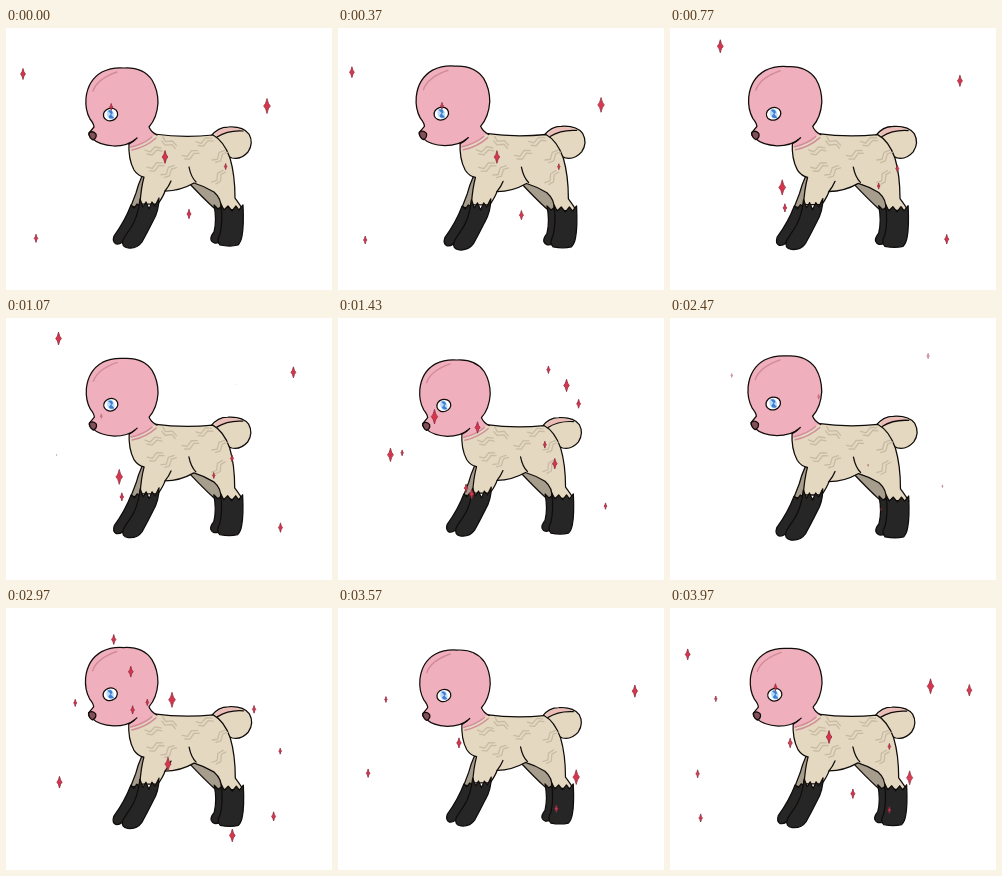
Animation of 326x262 px, one loop 4.01 s. Source, as an HTML page:

```html
<!DOCTYPE html>
<html lang="en">
<head>
<meta charset="utf-8">
<title>Sparkling lamb</title>
<style>
  html, body { margin: 0; width: 100%; height: 100%; overflow: hidden; background: #fff; }
  svg { display: block; width: 326px; height: 262px; }
  .line { fill: none; }
  .ink { stroke: #100c0a; stroke-width: 1.25; stroke-linejoin: round; stroke-linecap: round; }
  .wool { fill: #e4d8c0; }
  .shade { fill: #a79d8d; }
  .boot { fill: #262626; }
  .pink { fill: #f0afbd; }
  .curl { fill: none; stroke: #c8bba4; stroke-width: 1.3; stroke-linecap: round; stroke-linejoin: round; }
  .blush { fill: none; stroke: #d28c99; stroke-width: 1.5; stroke-linecap: round; }
  .spark { fill: #d9344b; stroke: #8f2c40; stroke-width: .8; vector-effect: non-scaling-stroke; }
</style>
</head>
<body>
<svg viewBox="0 0 326 262">
  <defs>
    <path id="curl" d="M-8 0l5 2l5-5l6 1M-6 4l5 1l5-5l5 1"/>
  </defs>
  <g id="scene">
    <!-- far legs -->
    <path class="shade ink" d="M136 148Q132 157 130 165L125 178L135 180L140 150Z"/>
    <path class="boot ink" d="M125 177L128 180L131 176L136 179Q131 196 120 209Q116 217 110 216Q106 214 108 208Q119 193 125 177Z"/>
    <path class="shade ink" d="M182 154L197 153L218 172L216 184L208 180Q198 171 182 154Z"/>
    <path class="boot ink" d="M208 177L212 181L216 178L219 196L214 214Q207 217 205 212Q204 209 208 204Q211 192 208 177Z"/>

    <!-- tail -->
    <path class="wool ink" d="M205 108Q212 99 222 99Q237 98 243 106Q248 115 242 124Q235 132 226 130Q219 128 215 119Z"/>
    <path d="M209 106Q214 100 222 100Q231 99 237 103Q222 102 212 109Z" fill="#ecbdb8"/>
    <path class="line ink" d="M211 109Q222 102 237 103"/>

    <!-- body with near legs -->
    <path class="wool ink" d="M123 114Q122 131 128 142Q132 148 138 149Q135 160 134 176L152 176Q158 167 159 163Q174 163 188 155Q198 158 208 164Q216 171 215 181L237 182Q235 178 229 170Q229 147 224 130Q218 113 207 107Q177 110 148 106Z"/>
    <path class="line ink" d="M183 139Q185 149 190 154M159 163Q163 158 165 153"/>
    <path class="boot ink" d="M134 171L137 179L140 174L143 181L146 174L149 178L153 170Q153 183 147 193Q141 205 136 214Q131 221 122 220Q115 219 117 212Q119 208 124 201Q132 190 134 171Z"/>
    <path class="boot ink" d="M215 176L218 182L222 178L226 183L230 178L233 182L237 177Q238 198 236 208Q235 214 232 217Q224 219 214 217Q210 213 214 206Q217 194 215 176Z"/>

    <g class="curl">
      <use href="#curl" transform="translate(147 122)"/>
      <use href="#curl" transform="translate(163 114) rotate(40)"/>
      <use href="#curl" transform="translate(149 138) rotate(-8)"/>
      <use href="#curl" transform="translate(162 143) rotate(-28)"/>
      <use href="#curl" transform="translate(184 126) rotate(-10)"/>
      <use href="#curl" transform="translate(198 113) rotate(-5)"/>
      <use href="#curl" transform="translate(213 128) rotate(-30)"/>
      <use href="#curl" transform="translate(212 149) rotate(-40)"/>
    </g>

    <!-- neck and head -->
    <path class="pink" d="M124 112L143 101L149 106Q139 116 124 120Z"/>
    <path class="blush" d="M125 119Q138 116 146 109M126 122Q140 119 150 110"/>
    <path class="pink ink" d="M130 111Q122 118 108 118Q93 117 87 111Q82 108 83 105L88 99Q88 96 84 91Q79 82 80 70Q82 52 96 44Q106 39 118 40Q137 39 146 52Q152 62 152 75Q151 90 143 99Q145 104 151 107"/>
    <path class="pink" d="M126 108L142 99L146 106L130 113Z"/>
    <path class="line ink" d="M131 110Q127 114 123 116"/>
    <path class="blush" d="M87 63Q91 51 111 44" stroke-width="2"/>
    <path d="M83 105Q87 102 90 106Q91 110 87 112Q83 110 83 105Z" fill="#835059" class="ink"/>
    <g transform="rotate(-18 104.5 86.5)">
      <ellipse cx="104.5" cy="86.5" rx="7.2" ry="6.2" fill="#fff" class="ink"/>
      <ellipse cx="104.5" cy="86.5" rx="3.6" ry="5" fill="#b9daf8"/>
      <path d="M103 82Q108 82 107 86L105 87L107 91Q102 91 102 88L105 86Z" fill="#3f7fd3"/>
    </g>
    <g id="sparks"></g>
  </g>
</svg>
<script>
const LOOP = 4010, FRAMES = 120;
const BIG = 15, SMALL = 6;
const LEAD_IN = 400, LEAD_OUT = 500, STAGGER = 160;
const SHAPE = "M0-.5Q.07-.13 .22 0Q.07 .13 0 .5Q-.07 .13-.22 0Q-.07-.13 0-.5Z";
const scene = document.getElementById("scene");
const layer = document.getElementById("sparks");

// Each burst places its brightest sparks and scatters the rest.
const bursts = [
  { at: 0, count: 7, lead: [[261, 78], [159, 129], [17, 46], [183, 186]] },
  { at: 770, count: 7, lead: [[113, 159], [52, 20], [288, 54], [275, 210]] },
  { at: 1430, count: 12, lead: [[95, 98], [50, 137], [230, 66], [139, 109], [218, 146], [133, 177]] },
  { at: 2000, count: 6, lead: [[256, 40], [149, 80], [64, 59], [210, 190]] },
  { at: 2970, count: 12, lead: [[166, 92], [162, 156], [226, 227], [54, 174], [125, 64], [108, 32]] },
  { at: 3570, count: 6, lead: [[240, 170], [300, 82], [120, 135], [27, 166]] }
];

let seed = 7;
function random() {
  seed = (seed * 16807) % 2147483647;
  return seed / 2147483647;
}
const scatter = () => [30 + 260 * random(), 40 + 185 * random()];

function makeSpark(burst, i) {
  const [x, y] = burst.lead[i] || scatter();
  const rank = i / (burst.count - 1);
  const el = document.createElementNS("http://www.w3.org/2000/svg", "path");
  el.setAttribute("d", SHAPE);
  el.setAttribute("class", "spark");
  layer.append(el);
  return { el, x, y, at: burst.at, size: BIG * (SMALL / BIG) ** rank,
           from: STAGGER * rank - LEAD_IN };
}

const sparks = bursts.flatMap(b =>
  Array.from({ length: b.count }, (_, i) => makeSpark(b, i)));

const clamp = v => Math.max(0, Math.min(1, v));
const smooth = v => v * v * (3 - 2 * v);

function drawSpark(s, time) {
  let t = time - s.at;
  if (t > LOOP / 2) t -= LOOP;
  const life = smooth(clamp(Math.min((t - s.from) / 110, (LEAD_OUT - t) / 150)));
  s.el.style.display = life > 0.02 ? "" : "none";
  s.el.setAttribute("transform", `translate(${s.x} ${s.y}) scale(${s.size * life})`);
  s.el.setAttribute("opacity", 0.3 + 0.7 * life);
}

function draw(now) {
  const step = LOOP / FRAMES;
  const t = Math.floor((now % LOOP) / step) * step;
  // The whole picture breathes about its centre, twice per loop.
  const zoom = 1 + 0.023 * Math.sin(t / LOOP * 4 * Math.PI);
  scene.setAttribute("transform", `translate(163 131) scale(${zoom}) translate(-163 -131)`);
  sparks.forEach(s => drawSpark(s, t));
}

const start = performance.now();
function tick() {
  draw(performance.now() - start);
  requestAnimationFrame(tick);
}
tick();
</script>
</body>
</html>
```
